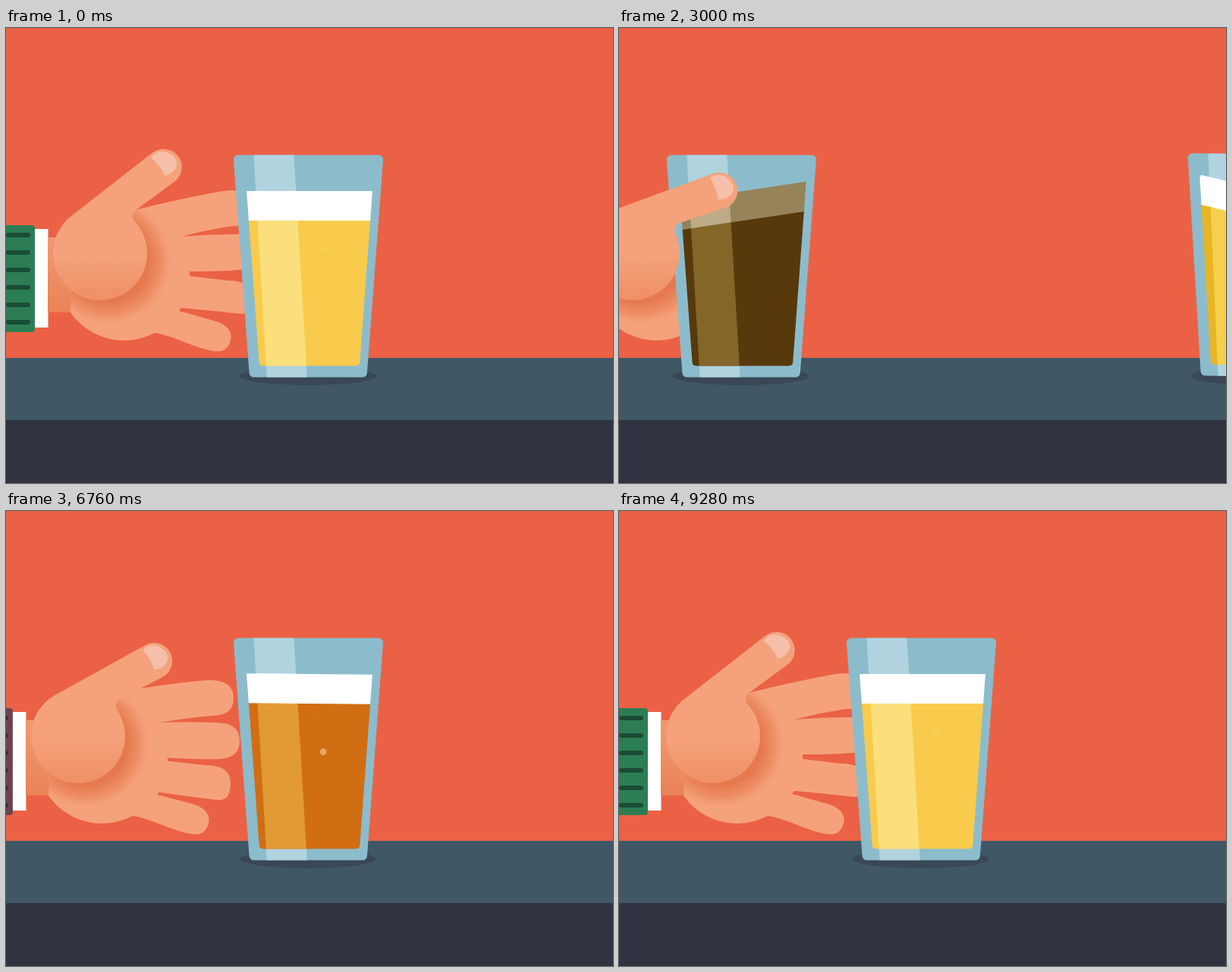
These frames come from a looping animation (800 px wide and 600 px high, 9.32 s). An HTML page with a canvas:

```html
<!DOCTYPE html>
<html lang="en">
<head>
<meta charset="utf-8">
<title>Another round</title>
<style>
  html, body { margin: 0; width: 100%; height: 100%; overflow: hidden; background: #eb6145; }
  canvas { display: block; }
</style>
</head>
<body>
<canvas id="stage" width="800" height="600"></canvas>
<script>
const ctx = document.getElementById('stage').getContext('2d');

const STEP = 40, LOOP = 9320, ROUND = 58;    // a round is counted in steps
const PULL = 10.55, LAND = 21.5, GAP = 683;  // glass leaves, next one stops, spacing
const SKIN = '#f5a27c';

const drinks = [
  { body: '#f8cb4c', shine: '#fbdf7c', foam: '#fff', foamShine: '#fff', bubble: '#f9d361', sleeve: '#2c7d54', rib: '#1a4c35' },
  { body: '#58390c', shine: '#856629', foam: '#96835a', foamShine: '#bcab86', bubble: '#6d5122', sleeve: '#35526e', rib: '#20344a' },
  { body: '#e9b524', shine: '#f4d04e', foam: '#fff', foamShine: '#fff', bubble: '#f6df8c', sleeve: '#4d5c5b', rib: '#2b3837' },
  { body: '#d16d12', shine: '#e29a35', foam: '#fff', foamShine: '#fff', bubble: '#e6a860', sleeve: '#6a4250', rib: '#432833' }
];

// x, height of the rest position and height of the wave, for bubbles: x, y at step 47, radius
const bubbles = [[418, 350, 5.2], [410, 303, 4.5], [432, 272, 2]];

const lerp = (a, b, t) => a + (b - a) * t;
const clamp = t => Math.max(0, Math.min(1, t));
const smooth = (a, b, t) => { t = clamp((t - a) / (b - a)); return t * t * (3 - 2 * t); };
const rad = deg => deg * Math.PI / 180;
const hump = (a, b, t) => t <= a || t >= b ? 0 : 4 * (t - a) * (b - t) / (b - a) ** 2;

function rect(color, x, y, w, h, r = 0) {
  ctx.fillStyle = color;
  ctx.beginPath();
  ctx.roundRect(x, y, w, h, r);
  ctx.fill();
}

function ellipse(color, x, y, rx, ry = rx) {
  ctx.fillStyle = color;
  ctx.beginPath();
  ctx.ellipse(x, y, rx, ry, 0, 0, 2 * Math.PI);
  ctx.fill();
}

function polygon(points) {
  const path = new Path2D();
  points.forEach(([x, y]) => path.lineTo(x, y));
  path.closePath();
  return path;
}

function rounded(points, r) {
  const path = new Path2D(), n = points.length;
  const [a, b] = [points[n - 1], points[0]];
  path.moveTo((a[0] + b[0]) / 2, (a[1] + b[1]) / 2);
  points.forEach((p, i) => path.arcTo(...p, ...points[(i + 1) % n], r));
  path.closePath();
  return path;
}

const glassShape = rounded([[299.5, 167.5], [497.5, 167.5], [475.5, 460.5], [321, 460.5]], 6);
const insideShape = rounded([[315.6, 195], [484.4, 195], [466, 445.5], [334, 445.5]], 5);
const shineShape = polygon([[326, 160], [379, 160], [397, 465], [344, 465]]);

function band(top, bottom, slope) {
  const dy = 100 * Math.tan(rad(slope));
  return polygon([[300, top - dy], [500, top + dy], [500, bottom + (bottom < 400 ? dy : 0)], [300, bottom - (bottom < 400 ? dy : 0)]]);
}

function drawContents(drink, slope) {
  const foam = band(215, 254, slope), body = band(253.5, 460, slope);
  ctx.fillStyle = drink.body;
  ctx.fill(body);
  ctx.fillStyle = drink.foam;
  ctx.fill(foam);
  ctx.clip(shineShape);
  ctx.fillStyle = drink.shine;
  ctx.fill(body);
  ctx.fillStyle = drink.foamShine;
  ctx.fill(foam);
}

function drawGlass(drink, x, tilt, slope, age) {
  const lift = clamp(-tilt / 8.6);
  ellipse('#394757', x + 398 + 13.5 * lift, 459, 90 + 17 * lift, 12 + 3.5 * lift);

  ctx.save();
  ctx.translate(x, 0);
  const pivot = tilt < 0 ? 322 : 475;
  ctx.translate(pivot, 460);
  ctx.rotate(rad(tilt));
  ctx.translate(-pivot, -460);

  ctx.fillStyle = '#8cbccc';
  ctx.fill(glassShape);
  ctx.save();
  ctx.clip(glassShape);
  ctx.fillStyle = '#b1d3df';
  ctx.fill(shineShape);
  ctx.restore();

  ctx.save();
  ctx.clip(insideShape);
  drawContents(drink, slope);
  ctx.restore();

  for (const [bx, by, r] of bubbles) {
    const y = by - 5.4 * (age - 47);
    if (y > 264 && y < 430) ellipse(drink.bubble, bx, y, r * Math.sin(Math.PI * (430 - y) / 166));
  }
  ctx.restore();

  // drops thrown up when the glass falls back on its base
  for (const [dx, drift, height, r, end] of [[362, -2, 86, 6, 37.5], [392, 1, 58, 4, 36]]) {
    const h = hump(28.5, end, age);
    if (h) ellipse(drink.foam, dx + drift * (age - 28.5), 215 - height * h, r);
  }
}

// open = 0: fingers level, open = 1: fingers spread
function palmShape(open) {
  const path = new Path2D();
  const at = (x, level, spread = level) => [x, lerp(level, spread, open)];
  const line = p => path.lineTo(...p);
  const finger = (top, tip, bottom) => {
    line(top);
    path.quadraticCurveTo(tip[0], top[1], ...tip);
    path.quadraticCurveTo(tip[0], bottom[1], ...bottom);
  };
  path.moveTo(90, 300);
  line([160, 246]);
  line([170, 240]);
  path.quadraticCurveTo(...at(230, 234, 225), ...at(285, 234, 215));
  finger(at(298, 234, 214), at(329, 258, 238), at(300, 281, 261));
  path.quadraticCurveTo(...at(270, 282, 265), ...at(231, 284, 275));
  path.quadraticCurveTo(...at(265, 284, 272), ...at(300, 287, 272));
  finger(at(308, 288, 272), at(337, 313, 296), at(306, 337, 319));
  path.quadraticCurveTo(...at(285, 336, 321), ...at(242, 331, 321));
  line(at(242, 333, 327));
  finger(at(292, 338, 333), at(325, 363, 355), at(310, 386, 377));
  path.quadraticCurveTo(...at(285, 385, 374), ...at(231, 373, 369));
  line(at(228, 375, 373));
  line([274, 386]);
  path.bezierCurveTo(292, 391, 299, 401, 296, 412);
  path.bezierCurveTo(292, 427, 281, 428, 268, 425);
  path.bezierCurveTo(240, 418, 218, 405, 196, 402);
  path.bezierCurveTo(186, 407, 172, 412, 155, 412);
  path.bezierCurveTo(125, 412, 98, 395, 85, 375);
  path.closePath();
  return path;
}

function drawArm(drink, open) {
  rect(drink.sleeve, -700, 260, 738, 141, 4);
  for (let y = 270; y < 390; y += 23) rect(drink.rib, 0, y, 32, 6, 3);
  rect('#fff', 38, 265, 17.5, 130);

  const wrist = ctx.createLinearGradient(0, 276, 0, 375);
  wrist.addColorStop(0, '#f19971');
  wrist.addColorStop(1, '#ea8356');
  rect(wrist, 55, 276, 45, 99);

  const palm = palmShape(open);
  ctx.fillStyle = SKIN;
  ctx.fill(palm);
  const shade = ctx.createRadialGradient(134, 307, 54, 134, 307, 88);
  shade.addColorStop(0, 'rgba(229,118,74,.95)');
  shade.addColorStop(0.5, 'rgba(232,126,83,.55)');
  shade.addColorStop(1, 'rgba(245,162,124,0)');
  ctx.fillStyle = shade;
  ctx.fill(palm);
}

function drawThumb(degrees) {
  const a = rad(degrees);
  ctx.save();
  ctx.translate(124, 297);
  ctx.rotate(-a);
  const shade = ctx.createLinearGradient(0, 0, -62 * Math.sin(a), 62 * Math.cos(a));
  shade.addColorStop(0, SKIN);
  shade.addColorStop(1, '#ef8f65');
  ctx.fillStyle = shade;
  ctx.beginPath();
  ctx.arc(0, 0, 62, 0.25, 2 * Math.PI - 1.3);
  ctx.arc(141, 0, 24, -1.3, 1.75);
  ctx.lineTo(80, 6);
  ctx.quadraticCurveTo(64, -2, 60, 15);
  ctx.fill();
  ctx.fillStyle = '#f5bfa9';
  ctx.fill(new Path2D('M141-21Q157-21 160-5Q162 9 152 13Q142 16 133 8Q140-5 141-21Z'));
  ctx.restore();
}

function handPose(p, pulled) {
  if (p >= 30) {
    const t = clamp((p - 47) / 11);
    return { x: 0.8 - 0.83 * (59 - p) ** 2, angle: 41 + 12.4 * t * t, open: t };
  }
  return { x: 131 * smooth(0, 9, p) + pulled, angle: lerp(53.6, 35.8, smooth(2, 10, p)), open: 1 };
}

function tiltAt(p) {
  if (p < LAND) return 0.8;
  return -9.5 * hump(LAND, 28.5, p) + 2 * hump(28.5, 33.5, p) - 0.7 * hump(33.5, 37, p);
}

function sloshAt(p) {
  const t = Math.max(0, p - 21);
  return 13 * Math.exp(-t / 10) * Math.cos(2 * Math.PI * t / 16);
}

function draw(step) {
  const p = step % ROUND, round = Math.floor(step / ROUND);
  const current = drinks[round % 4], next = drinks[(round + 1) % 4];
  const pulled = p < PULL ? 0 : -5.7 * (p - PULL) ** 2;
  const hand = handPose(p, pulled);

  rect('#eb6145', 0, 0, 800, 435);
  rect('#405766', 0, 435, 800, 82);
  rect('#303440', 0, 517, 800, 83);

  ctx.save();
  ctx.translate(hand.x, 0);
  drawArm(p < 30 ? current : next, hand.open);
  ctx.restore();

  if (p < LAND) drawGlass(current, pulled, 0, -8.5 * smooth(10, 16, p), p + ROUND);
  drawGlass(next, p < LAND ? GAP + pulled : 0, tiltAt(p), sloshAt(p), p);

  ctx.save();
  ctx.translate(hand.x, 0);
  drawThumb(hand.angle);
  ctx.restore();
}

function tick() {
  // the next glass waits off stage until the current one is pulled away
  draw(Math.floor(performance.now() % LOOP / STEP));
  requestAnimationFrame(tick);
}
tick();
</script>
</body>
</html>
```
